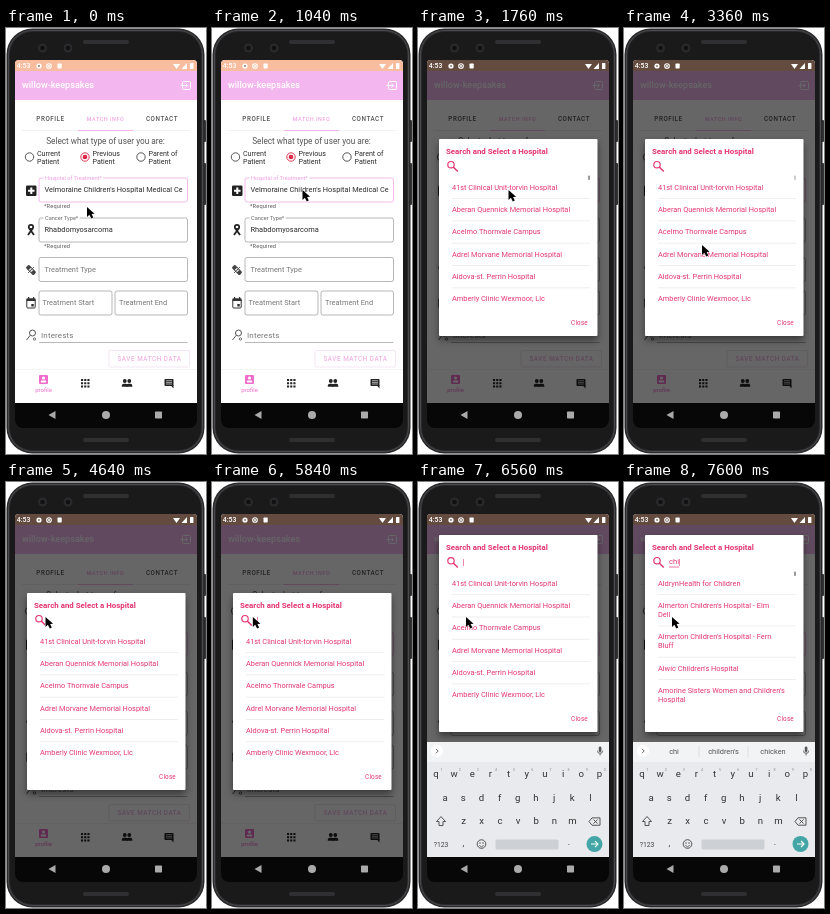
Animation, 200 px wide and 426 px high, one loop 8000 ms. Source, as an HTML page with a canvas:

```html
<!DOCTYPE html>
<html lang="en">
<head>
<meta charset="utf-8">
<title>Hospital search</title>
<style>
html, body { margin: 0; width: 100%; height: 100%; overflow: hidden; background: #fff; }
canvas { display: block; width: 200px; height: 426px; }
</style>
</head>
<body>
<canvas id="stage"></canvas>
<script>
const canvas = document.getElementById('stage');
const ctx = canvas.getContext('2d');
const dpr = window.devicePixelRatio || 1;
canvas.width = 200 * dpr;
canvas.height = 426 * dpr;

const LOOP = 8000, STEP = 80;
const LEFT = 9, TOP = 32, WIDTH = 182, PAGE_END = 375, SCREEN_END = 400;
const PINK = '#f06ccb', ROSE = '#e3366f', INK = '#2b2b2b', GREY = '#777';

const HOSPITALS = [
  ['41st Clinical Unit-torvin Hospital'], ['Aberan Quennick Memorial Hospital'],
  ['Acelmo Thornvale Campus'], ['Adrel Morvane Memorial Hospital'],
  ['Aldova-st. Perrin Hospital'], ['Amberly Clinic Wexmoor, Llc']
];
const CHILDREN = [
  ['AldrynHealth for Children'], ["Almerton Children's Hospital - Elm", 'Dell'],
  ["Almerton Children's Hospital - Fern", 'Bluff'], ["Alwic Children's Hospital"],
  ["Amorine Sisters Women and Children's", 'Hospital']
];
// time, x, y of the pointer tip
const PATH = [
  [0, 81, 179], [80, 81, 179], [640, 90.5, 162], [2080, 90.5, 162], [2960, 80, 214],
  [3360, 78, 217], [3840, 75, 211], [4640, 39.5, 135], [5760, 39.5, 135],
  [6080, 48, 135], [LOOP, 48, 135]
];

const clamp = v => Math.max(0, Math.min(1, v));
const smooth = v => v * v * (3 - 2 * v);

function rect(x, y, w, h, color, r = 0) {
  ctx.fillStyle = color;
  ctx.beginPath();
  ctx.roundRect(x, y, w, h, r);
  ctx.fill();
}
function frame(x, y, w, h, color, r = 2, lw = 0.7) {
  ctx.strokeStyle = color;
  ctx.lineWidth = lw;
  ctx.beginPath();
  ctx.roundRect(x, y, w, h, r);
  ctx.stroke();
}
function disc(x, y, r, color) {
  ctx.fillStyle = color;
  ctx.beginPath();
  ctx.arc(x, y, r, 0, 7);
  ctx.fill();
}
function ring(x, y, r, color, lw = 0.9) {
  ctx.strokeStyle = color;
  ctx.lineWidth = lw;
  ctx.beginPath();
  ctx.arc(x, y, r, 0, 7);
  ctx.stroke();
}
function line(color, lw, ...p) {
  ctx.strokeStyle = color;
  ctx.lineWidth = lw;
  ctx.beginPath();
  for (let i = 0; i < p.length; i += 2) ctx.lineTo(p[i], p[i + 1]);
  ctx.stroke();
}
function poly(color, ...p) {
  ctx.fillStyle = color;
  ctx.beginPath();
  for (let i = 0; i < p.length; i += 2) ctx.lineTo(p[i], p[i + 1]);
  ctx.fill();
}
function text(s, x, y, size, color, { weight = 400, align = 'left', gap = 0 } = {}) {
  ctx.font = `${weight} ${size}px Roboto, sans-serif`;
  ctx.letterSpacing = gap + 'px';
  ctx.textAlign = align;
  ctx.textBaseline = 'middle';
  ctx.fillStyle = color;
  ctx.fillText(s, x, y);
}
function clipped(x, y, w, h, draw, r = 0) {
  ctx.save();
  ctx.beginPath();
  ctx.roundRect(x, y, w, h, r);
  ctx.clip();
  draw();
  ctx.restore();
}

function drawPhone() {
  rect(197, 92, 3, 22, '#333', 1);
  rect(197, 135, 3, 42, '#333', 1);
  rect(0.5, 0.5, 198, 425, '#29292b', 26);
  frame(2.5, 2.5, 194, 421, '#4b4b4e', 24, 1);
  rect(4, 4, 191, 418, '#1a1a1b', 22);
  for (const x of [36.5, 62]) {
    disc(x, 20, 4.5, '#2a2a2c');
    disc(x, 20, 2.3, '#111');
  }
  for (const y of [12, 410]) rect(77, y, 46, 4, '#303032', 2);
}

function drawStatusIcons() {
  text('4:53', 10.8, 38.3, 6.9, '#fff', { weight: 500 });
  disc(33, 38, 2.6, '#fff');
  disc(33, 38, 0.9, '#8b6a5c');
  ring(43, 38, 2.3, '#fff', 1.1);
  disc(43, 38, 1, '#fff');
  rect(51.5, 35.5, 4.2, 5, '#fff', 0.7);
  poly('#fff', 167, 36, 174, 36, 170.5, 41);
  poly('#fff', 181, 35, 181, 41, 175.5, 41);
  rect(184, 35, 3.4, 6, '#fff', 0.6);
}

function drawHeader() {
  rect(LEFT, 43, WIDTH, 29, '#f4b6ee');
  text('willow-keepsakes', 16, 57.5, 9.1, '#fff', { weight: 500 });
  frame(176.5, 53.5, 8, 8, '#fff', 1, 1);
  line('#fff', 1, 174.5, 57.5, 181.5, 57.5);
  line('#fff', 1, 179.5, 55.5, 181.5, 57.5, 179.5, 59.5);
}

function drawRadio(x, first, second, on) {
  const color = on ? '#dc2645' : '#444';
  ring(x, 129, 4.2, color);
  if (on) disc(x, 129, 2.3, color);
  text(first, x + 7.5, 126, 7.1, INK);
  text(second, x + 7.5, 133.8, 7.1, INK);
}

function drawField(x, y, w, border, label, labelColor) {
  frame(x, y, w, 24, border);
  if (!label) return;
  ctx.font = '400 5.6px Roboto, sans-serif';
  ctx.letterSpacing = '0px';
  rect(x + 4.5, y - 2, ctx.measureText(label).width + 3, 4, '#fff');
  text(label, x + 6, y, 5.6, labelColor);
}

function drawFormIcons() {
  rect(20, 157.5, 10.5, 10.5, '#222', 1.2);
  rect(24.3, 159.5, 2, 6.5, '#fff');
  rect(22, 161.8, 6.5, 2, '#fff');

  ring(25, 199, 2.2, '#222', 1.7);
  line('#222', 1.8, 23.4, 200.5, 28, 207);
  line('#222', 1.8, 26.6, 200.5, 22, 207);

  ctx.save();
  ctx.translate(25, 242);
  ctx.rotate(Math.PI / 4);
  rect(-5.5, -2.3, 11, 4.6, '#444', 1.5);
  rect(-1.7, -1.5, 3.4, 3, '#ddd');
  ctx.restore();
  line('#444', 0.8, 22, 245, 28, 239);

  frame(20.8, 271, 8.4, 9, '#333', 1, 1);
  rect(20.5, 270.5, 9, 2.5, '#333');
  rect(22, 269, 1.2, 2, '#333');
  rect(27, 269, 1.2, 2, '#333');
  rect(25.3, 276, 2.5, 2.5, '#333');

  ring(26.5, 305, 3, '#555', 1);
  line('#555', 1, 24.3, 307.2, 20.5, 312);
  ring(28.5, 311, 1.2, '#555', 0.8);
}

function drawBottomNav() {
  line('#eee', 0.6, LEFT, 341.5, LEFT + WIDTH, 341.5);
  rect(33, 347, 9, 9, PINK, 1);
  disc(37.5, 350, 1.6, '#fff');
  rect(34.7, 352.6, 5.6, 2, '#fff', 1);
  text('profile', 37.5, 362, 6, PINK, { align: 'center' });
  for (let i = 0; i < 9; i++)
    rect(75 + (i % 3) * 3.2, 351 + Math.floor(i / 3) * 3.2, 2.1, 2.1, '#222');
  for (const x of [118.8, 123.3]) {
    disc(x, 353, 1.9, '#222');
    rect(x - 3, 355.8, 6, 3, '#222', [2, 2, 0, 0]);
  }
  rect(158.5, 351, 9, 7, '#222', 0.8);
  poly('#222', 164.5, 357, 167.5, 357, 167.5, 360.5);
  for (const y of [352.7, 354.4, 356]) line('#fff', 0.6, 160, y, 166, y);
}

function drawPage() {
  rect(LEFT, TOP, WIDTH, PAGE_END - TOP, '#fff');
  rect(LEFT, TOP, WIDTH, 11, '#f8bd9f');
  drawHeader();
  const tab = { weight: 500, align: 'center', gap: 0.55 };
  text('PROFILE', 44.5, 91, 6.3, '#555', tab);
  text('MATCH INFO', 99.5, 91, 5.4, '#f2a5e4', tab);
  text('CONTACT', 156, 91, 6.3, '#555', tab);
  line('#e9e9e9', 0.6, 16, 102.5, 184, 102.5);
  line('#f2b4ea', 1, 72, 102.5, 127, 102.5);
  text('Select what type of user you are:', 99.5, 114, 8.25, '#555', { align: 'center' });
  drawRadio(23.5, 'Current', 'Patient', false);
  drawRadio(79, 'Previous', 'Patient', true);
  drawRadio(135, 'Parent of', 'Patient', false);

  drawField(33, 150, 148.5, '#ee9fe2', 'Hospital of Treatment*', '#ee9fe2');
  clipped(36, 152, 140.5, 20, () =>
    text("Velmoraine Children's Hospital Medical Center", 38.5, 162.3, 7.4, INK));
  text('*Required', 38, 178.5, 5.6, '#555', { gap: 0.2 });
  drawField(33, 190, 148.5, '#999', 'Cancer Type*', '#666');
  text('Rhabdomyosarcoma', 38.5, 202, 7.4, INK);
  text('*Required', 38, 218.8, 5.6, '#555', { gap: 0.2 });
  drawField(33, 229.5, 148.5, '#999');
  text('Treatment Type', 38.5, 242, 7.4, GREY);
  drawField(33, 263, 73, '#999');
  text('Treatment Start', 36.5, 275, 7.4, GREY);
  drawField(109, 263, 72.5, '#999');
  text('Treatment End', 113, 275, 7.4, GREY);
  text('Interests', 35, 307.5, 8, GREY, { gap: 0.15 });
  line('#999', 0.7, 33, 314.5, 181.5, 314.5);
  drawFormIcons();
  frame(103, 322.5, 80.5, 16.5, '#f0dced', 1.5);
  text('SAVE MATCH DATA', 143.5, 331, 6.3, '#efb3e4', tab);
  drawBottomNav();
}

function drawSystemNav() {
  rect(LEFT, PAGE_END, WIDTH, SCREEN_END - PAGE_END, '#070707');
  poly('#aaa', 42.5, 387, 49.5, 383, 49.5, 391);
  disc(100, 387, 4, '#aaa');
  rect(149, 383.5, 7, 7, '#aaa', 0.8);
}

function drawList(items, top) {
  clipped(21, top + 38, 158, 135, () => {
    let y = top + 38.3;
    items.forEach((lines, i) => {
      const height = lines.length > 1 ? 31.3 : 22.3;
      const mid = y + height / 2;
      lines.forEach((s, n) =>
        text(s, 34, mid + (n - (lines.length - 1) / 2) * 8.6, 7.4, ROSE));
      y += height;
      if (i < items.length - 1) line('#e2e2e2', 0.6, 34, y, 172, y);
    });
  });
}

function drawDialog(top, query, items, caret, scrollbar) {
  ctx.save();
  ctx.shadowColor = 'rgba(0,0,0,0.45)';
  ctx.shadowBlur = 7 * dpr;
  ctx.shadowOffsetY = 4 * dpr;
  rect(21, top + 1, 158.5, 197, '#fff', 1);
  ctx.restore();
  text('Search and Select a Hospital', 28, top + 14, 7.9, ROSE, { weight: 700 });
  ring(33, top + 26.7, 3.2, ROSE, 1.2);
  line(ROSE, 1.5, 35.2, top + 29, 39.8, top + 33.5);
  text(query, 45, top + 28, 7.6, ROSE);
  const end = 45 + ctx.measureText(query).width;
  if (query) line(ROSE, 0.7, 45, top + 33, end, top + 33);
  if (caret) line(ROSE, 0.6, end + 0.5, top + 25, end + 0.5, top + 32);
  drawList(items, top);
  if (scrollbar > 0) {
    ctx.save();
    ctx.globalAlpha *= scrollbar;
    rect(170, top + 37.5, 2, 4.5, '#999', 0.8);
    ctx.restore();
  }
  text('Close', 161.5, top + 185, 6.3, ROSE, { align: 'center', gap: 0.2 });
}

function drawKeyRow(keys, x, y, digits) {
  [...keys].forEach((key, i) => {
    const cx = x + i * 18.15;
    text(key, cx, y, 9.6, '#333', { align: 'center' });
    if (digits) text((i + 1) % 10, cx + 5.5, y - 5, 3.6, '#888', { align: 'center' });
  });
}

function drawKeyboard(dy, query) {
  ctx.save();
  ctx.translate(0, dy);
  rect(LEFT, 260, WIDTH, PAGE_END - 260, '#e8eaed');
  rect(LEFT, 260, WIDTH, 20, '#f1f3f4');
  disc(19, 269, 6, '#fff');
  line('#555', 0.9, 18, 266.8, 20.2, 269, 18, 271.2);
  rect(180.8, 264.5, 2.6, 5.5, '#555', 1.3);
  line('#555', 0.8, 179.5, 268.5, 180.3, 271, 183.9, 271, 184.7, 268.5);
  line('#555', 0.8, 182.1, 271, 182.1, 273.5);
  if (query) {
    [query, "children's", 'chicken'].forEach((s, i) =>
      text(s, 50 + i * 49.5, 270, 7.4, '#555', { align: 'center' }));
    for (const x of [75, 124]) line('#d4d6d9', 0.6, x, 264, x, 275);
  }
  drawKeyRow('qwertyuiop', 18, 292.5, true);
  drawKeyRow('asdfghjkl', 27.2, 316);
  drawKeyRow('zxcvbnm', 45.6, 339);

  ctx.lineJoin = 'round';
  line('#444', 0.9, 23, 334.5, 27.5, 339.5, 25, 339.5, 25, 343.5, 21, 343.5, 21, 339.5, 18.5, 339.5, 23, 334.5);
  line('#444', 0.9, 171, 339.5, 174, 335.8, 182, 335.8, 182, 343.2, 174, 343.2, 171, 339.5);
  line('#444', 0.9, 175.5, 337.5, 179.5, 341.5);
  line('#444', 0.9, 179.5, 337.5, 175.5, 341.5);

  text('?123', 23, 362.5, 6.8, '#444', { align: 'center' });
  text(',', 45.5, 361, 9, '#444', { align: 'center' });
  ring(63.5, 362, 4.3, '#444');
  disc(62, 361, 0.7, '#444');
  disc(65, 361, 0.7, '#444');
  line('#444', 0.8, 61.3, 363.3, 63.5, 364.8, 65.7, 363.3);
  rect(77.5, 357.5, 63, 10, '#cdd0d4', 1.5);
  text('.', 151, 360.5, 9, '#444', { align: 'center' });
  disc(176.5, 362, 8, '#43a5a6');
  line('#fff', 1.1, 173, 362, 180, 362);
  line('#fff', 1.1, 177, 359, 180, 362, 177, 365);
  ctx.restore();
}

function drawPointer(t) {
  const i = PATH.findIndex(p => p[0] > t);
  const [t0, x0, y0] = PATH[i - 1];
  const [t1, x1, y1] = PATH[i];
  const k = smooth((t - t0) / (t1 - t0));
  ctx.save();
  ctx.translate(x0 + (x1 - x0) * k, y0 + (y1 - y0) * k);
  const shape = [0, 0, 0, 10, 2.4, 7.8, 4.3, 11.5, 6.3, 10.5, 4.6, 7, 7.6, 6.8, 0, 0];
  ctx.lineJoin = 'round';
  line('#fff', 1, ...shape);
  poly('#000', ...shape);
  ctx.restore();
}

function queryAt(t) {
  if (t < 7200) return '';
  if (t < 7360) return 'c';
  return t < 7520 ? 'ch' : 'chi';
}

function drawScreen(t) {
  const open = clamp((t - 1550) / 210);
  const lift = 1 - (1 - clamp((t - 6240) / 360)) ** 3;
  const query = queryAt(t);
  drawPage();
  drawSystemNav();
  if (open > 0) {
    const shade = 0.6 * open * (0.4 + 0.6 * open);
    rect(LEFT, TOP, WIDTH, PAGE_END - TOP, `rgba(0,0,0,${shade})`);
    ctx.globalAlpha = open;
    const items = t < 7360 ? HOSPITALS : CHILDREN;
    const scrollbar = t < 7200 ? clamp((3680 - t) / 640) : 1;
    drawDialog(110 - 58 * lift, query, items, t >= 5600, scrollbar);
  }
  ctx.globalAlpha = 1;
  drawStatusIcons();
  if (lift > 0) {
    ctx.globalAlpha = Math.min(1, lift * 1.3);
    drawKeyboard(47 * (1 - lift), query);
    ctx.globalAlpha = 1;
  }
}

function render(t) {
  ctx.setTransform(dpr, 0, 0, dpr, 0, 0);
  ctx.globalAlpha = 1;
  rect(0, 0, 200, 426, '#fff');
  drawPhone();
  clipped(LEFT, TOP, WIDTH, SCREEN_END - TOP, () => drawScreen(t), [4, 4, 8, 8]);
  drawPointer(t);
}

function tick() {
  const t = performance.now() % LOOP;
  render(Math.floor(t / STEP) * STEP);
  requestAnimationFrame(tick);
}
tick();
</script>
</body>
</html>
```
